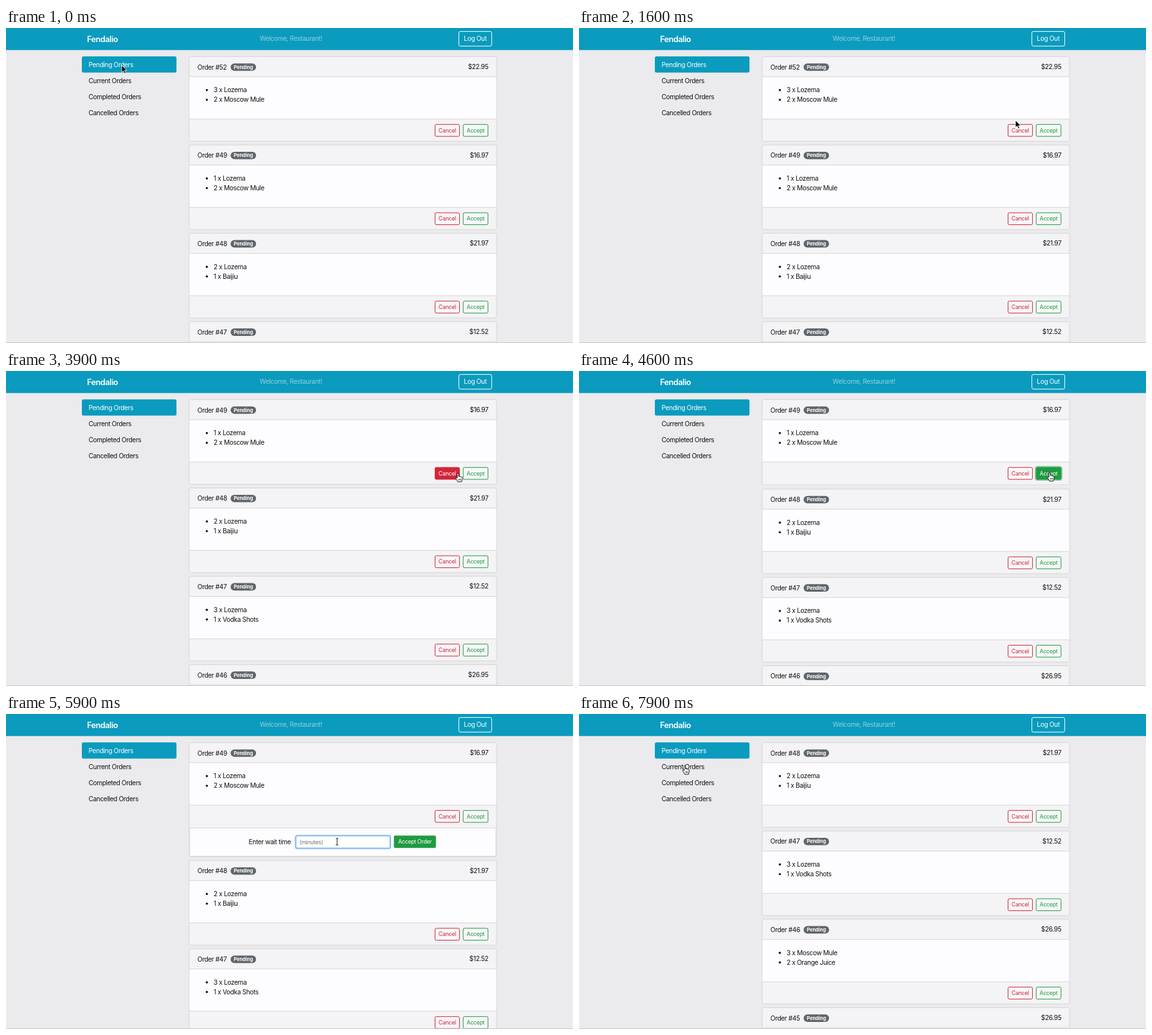
An HTML page that plays this animation: 882x491 px, repeating every 8000 ms.

```html
<!DOCTYPE html>
<html lang="en">
<head>
<meta charset="utf-8">
<title>Pending orders</title>
<style>
html, body { margin: 0; width: 100%; height: 100%; overflow: hidden; background: #ebeaec; }
svg { display: block; width: 882px; height: 491px; }
text { font: 10.08px Inter, "Open Sans", sans-serif; letter-spacing: -.034em; fill: #111; white-space: pre; }
.brand { font-size: 12.6px; font-weight: 600; fill: #fff; }
.small { font-size: 8.82px; }
.badge { font-size: 7.56px; font-weight: 700; letter-spacing: -.01em; fill: #fff; }
.option { font-size: 11.4px; fill: #fff; }
.mid { text-anchor: middle; }
.end { text-anchor: end; }
</style>
</head>
<body>
<svg id="stage" viewBox="0 0 882 491"></svg>
<script>
const LOOP = 8000;
const TEAL = '#0a9bbe', RED = '#d1263b', GREEN = '#1f9b40', LINE = '#d6d5d7';
const TOP = 44.6, PITCH = 137.7, CARD_H = 131.9, FORM_H = 46;

const ORDERS = [
  [52, '22.95', '3 x Lozema', '2 x Moscow Mule'],
  [49, '16.97', '1 x Lozema', '2 x Moscow Mule'],
  [48, '21.97', '2 x Lozema', '1 x Baijiu'],
  [47, '12.52', '3 x Lozema', '1 x Vodka Shots'],
  [46, '26.95', '3 x Moscow Mule', '2 x Orange Juice'],
  [45, '26.95']
];
const NAV = ['Pending Orders', 'Current Orders', 'Completed Orders', 'Cancelled Orders'];

// Moments of each interaction, in ms
const AT = { cancel: 2900, cancelled: 3300, accept: 4500, open: 4560, input: 5400, type: 6000, submit: 6900, accepted: 7100 };

// Pointer stops: time, x, y
const PATH = [
  [0, 180, 58], [600, 180, 58], [1600, 679, 144], [2000, 687, 160], [3700, 687, 160],
  [4200, 732, 158], [4650, 732, 158], [5000, 530.5, 184], [5200, 515, 199], [6000, 515, 199],
  [6500, 654.5, 197], [7150, 654.5, 197], [7800, 164.5, 80.5], [LOOP, 164.5, 80.5]
];

const CANCEL = { x: 667.4, y: 150.3, w: 38, h: 18.6 };
const ACCEPT = { x: 711.2, y: 150.3, w: 38.6, h: 18.6 };
const INPUT = { x: 451, y: 190, w: 146.4, h: 19 };
const SUBMIT = { x: 603.4, y: 189.6, w: 65.4, h: 19.2 };
const NAV_LINKS = { x: 118, y: 69.6, w: 147, h: 75.6 };

const smooth = p => { p = Math.max(0, Math.min(1, p)); return p * p * (3 - 2 * p); };
const hit = (p, b) => p.x >= b.x && p.x <= b.x + b.w && p.y >= b.y && p.y <= b.y + b.h;
const rect = (x, y, w, h, fill, extra = '') =>
  `<rect x="${x}" y="${y}" width="${w}" height="${h}" fill="${fill}" ${extra}/>`;
const text = (x, y, s, cls = '', fill = '') =>
  `<text x="${x}" y="${y}" class="${cls}" ${fill && `style="fill:${fill}"`}>${s}</text>`;
const ring = (b, color, width = 2) =>
  rect(b.x - 1, b.y - 1, b.w + 2, b.h + 2, 'none', `rx="3" stroke="${color}" stroke-width="${width}"`);

function pointerAt(t) {
  const i = Math.max(1, PATH.findIndex(k => k[0] > t));
  const [t0, x0, y0] = PATH[i - 1], [t1, x1, y1] = PATH[i];
  const p = smooth((t - t0) / (t1 - t0));
  return { x: x0 + (x1 - x0) * p, y: y0 + (y1 - y0) * p };
}

function button(b, label, color, filled, focus) {
  return (focus ? ring(b, focus, 2.4) : '') +
    rect(b.x, b.y, b.w, b.h, filled ? color : '#f8f7f9', `rx="2" stroke="${color}"`) +
    text(b.x + b.w / 2, b.y + 12.5, label, 'small mid', filled ? '#fff' : color);
}

function form(s) {
  const focused = s.focus === 'input';
  return `<clipPath id="fold"><rect x="284" y="176" width="480" height="${s.formH + 1}"/></clipPath>
    <g clip-path="url(#fold)">` +
    rect(285.8, 177.6, 476.4, 44.2, '#fdfcfe', `rx="2" stroke="${LINE}"`) +
    text(377.6, 203, 'Enter wait time') +
    (focused ? ring(INPUT, '#a9cdf5', 1.6) : '') +
    rect(INPUT.x, INPUT.y, INPUT.w, INPUT.h, '#fff', `rx="2" stroke="${focused ? '#5b9eea' : '#c5ced2'}"`) +
    (s.typed ? text(456.5, 203, '2', 'small') : text(456.5, 203, '(minutes)', 'small', '#6c757d')) +
    rect(SUBMIT.x, SUBMIT.y, SUBMIT.w, SUBMIT.h, s.over === SUBMIT ? '#1c8737' : GREEN, 'rx="2"') +
    text(636, 202.4, 'Accept Order', 'small mid', '#fff') + '</g>';
}

function card([id, price, ...items], row, s) {
  const first = row === 0;
  const extra = first ? s.formH : 0;
  const dy = row * PITCH + (first ? 0 : s.formH);
  const list = items.map((item, i) =>
    `<circle cx="312.4" cy="${96.8 + i * 15.1}" r="1.7" fill="#111"/>` + text(323, 100.2 + i * 15.1, item)).join('');
  return `<g transform="translate(0 ${dy})">` +
    rect(285, TOP, 478, CARD_H + extra, '#f4f3f5', `rx="2.5" stroke="${LINE}"`) +
    rect(285.5, 76, 477, 66, '#fdfcfe') +
    rect(285, 75.4, 478, 1, LINE) + rect(285, 141.4, 478, 1, LINE) +
    text(297.8, 64.6, 'Order #' + id) +
    rect(349.4, 55.2, 39.6, 11.6, '#5f656b', 'rx="5.8"') + text(369.2, 63.8, 'Pending', 'badge mid') +
    text(750.4, 64.1, '$' + price, 'end') + list +
    button(CANCEL, 'Cancel', RED, first && s.over === CANCEL, first && s.focus === 'cancel' && '#4f94d6') +
    button(ACCEPT, 'Accept', GREEN, first && s.over === ACCEPT, first && s.focus === 'accept' && '#8fcd9f') +
    (extra ? form(s) : '') + '</g>';
}

function page() {
  return rect(0, 0, 882, 491, '#ebeaec') + rect(0, 0, 882, 34.4, TEAL) +
    text(126, 21.5, 'Fendalio', 'brand') +
    text(443.2, 20.2, 'Welcome, Restaurant!', 'mid', '#93cfdf') +
    rect(704.4, 5.4, 51.2, 22.8, 'none', 'rx="2.5" stroke="#fff"') +
    text(730, 20.4, 'Log Out', 'mid', '#fff') +
    rect(118, 44.2, 147.2, 25.3, TEAL, 'rx="2.5"') +
    NAV.map((label, i) => text(128.5, 60.6 + i * 25.15, label, '', i ? '' : '#fff')).join('');
}

function dropdown() {
  return rect(450.4, 211.2, 161.6, 74.4, '#000', 'rx="3" opacity=".2"') +
    rect(450.6, 210.4, 161, 73.6, '#222326', 'rx="2.5"') +
    text(461, 236.2, '2', 'option') + text(461, 266.4, '23', 'option');
}

function cursor(s) {
  const { x, y } = s.pointer;
  let shape;
  if (s.over === INPUT) {
    shape = '<path d="M-2 -5.5Q0 -5.5 0 -4Q0 -5.5 2 -5.5M0 -4V4M-2 5.5Q0 5.5 0 4Q0 5.5 2 5.5" fill="none" stroke="#222"/>';
  } else if (s.over) {
    shape = `<path d="M-1.1 1C-1.1 -.5 1.1 -.5 1.1 1V5.2C1.6 4.4 3 4.6 3.1 5.5C3.8 4.9 5 5.2 5.1 6.1C5.9 5.7 6.9 6.1 6.9 7.2
      V9.5C6.9 11 6 11.7 5.8 13.5H-.2C-.5 12 -1.6 10.8 -2.4 9.4C-3 8.5 -3.8 7.7 -3.5 7C-3 6.2 -1.9 6.7 -1.1 7.8Z"
      fill="#fff" stroke="#000" stroke-width=".9"/><path d="M1.4 8.8v2.6M3 8.8v2.6M4.6 8.8v2.6" stroke="#000" stroke-width=".7"/>`;
  } else {
    shape = '<path d="M0 0V11.2L2.6 8.8L4.4 12.9L6.3 12.1L4.5 8.1H8Z" fill="#000" stroke="#fff" stroke-width=".8"/>';
  }
  return `<g transform="translate(${x} ${y})">${shape}</g>`;
}

function stateAt(t) {
  const pointer = pointerAt(t);
  const formH = t < AT.accepted ? FORM_H * smooth((t - AT.open) / 350) : 0;
  const targets = [CANCEL, ACCEPT, NAV_LINKS].concat(formH > 40 ? [INPUT, SUBMIT] : []);
  const within = (from, to) => t >= from && t < to;
  return {
    pointer, formH,
    over: targets.find(b => hit(pointer, b)),
    first: (t >= AT.cancelled) + (t >= AT.accepted),
    typed: t >= AT.type,
    menu: within(AT.type, AT.submit),
    focus: within(AT.cancel, AT.cancelled) ? 'cancel'
      : within(AT.accept, AT.input) ? 'accept'
      : within(AT.input, AT.submit) ? 'input' : ''
  };
}

const stage = document.getElementById('stage');
const backdrop = page();

function draw(now) {
  const s = stateAt(now % LOOP);
  stage.innerHTML = backdrop +
    ORDERS.slice(s.first, s.first + 4).map((order, row) => card(order, row, s)).join('') +
    (s.menu ? dropdown() : '') + rect(0, 490.2, 882, .8, '#bdbcbe') + cursor(s);
}

const start = performance.now();
function tick() {
  draw(performance.now() - start);
  requestAnimationFrame(tick);
}
tick();
</script>
</body>
</html>
```
